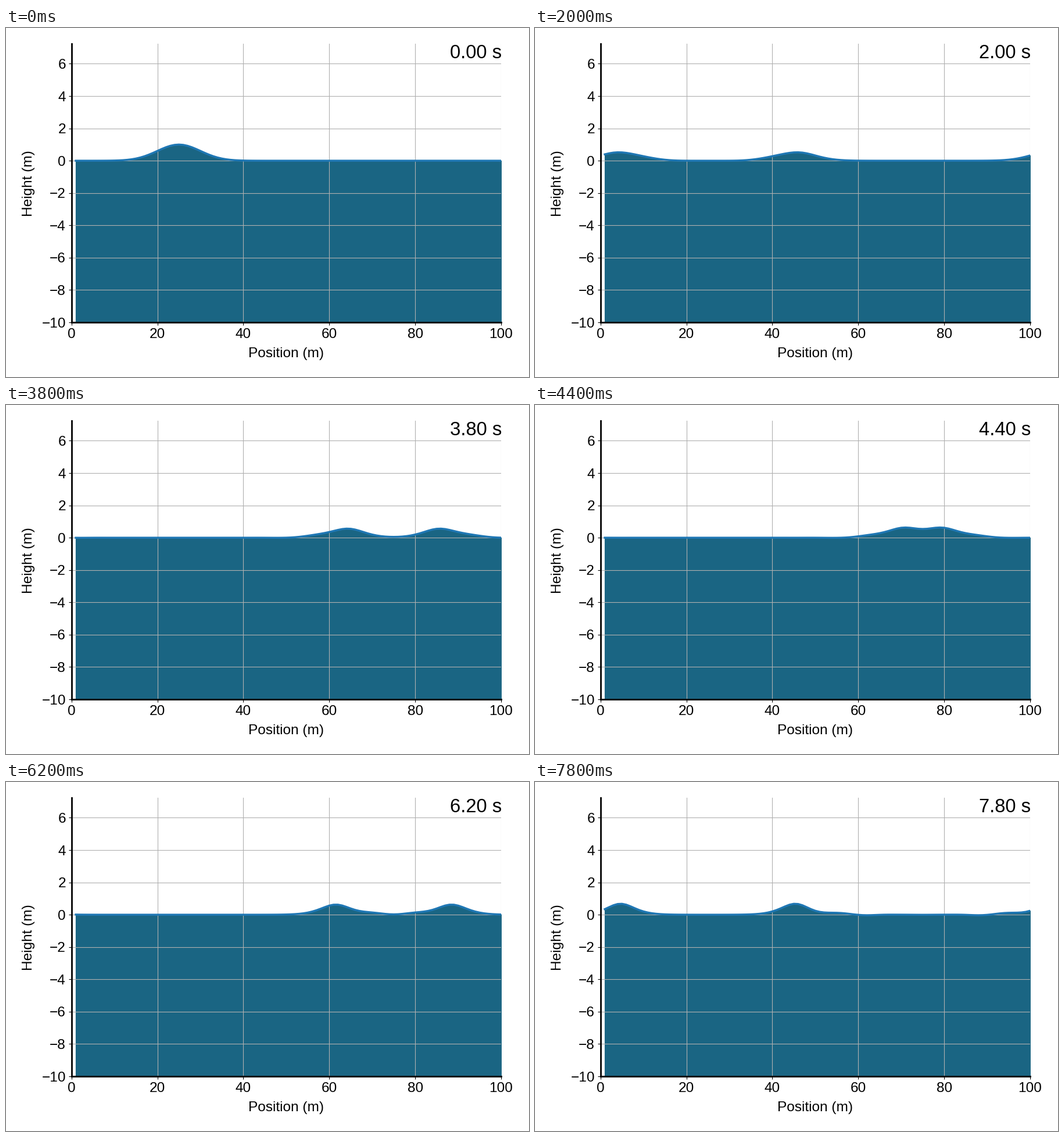
Animation, 900 px wide and 600 px high, one loop 8000 ms. Source, as a matplotlib script:

```python
import matplotlib.pyplot as plt
import numpy as np
from matplotlib.animation import FuncAnimation

W, H, DPI = 900, 600, 100
FRAMES, INTERVAL = 40, 200

# Shallow water on a periodic 100 m grid
GRAVITY, DEPTH = 9.81, 10.0
DT, STEPS = 0.01, 20
LEFT, RIGHT, TOP, BOTTOM = 112.7, 852, 26.7, 506.07
WATER = "#1a6583"


def slope(a):
    """Centred periodic difference for 1 m spacing."""
    return 0.5 * (np.roll(a, -1) - np.roll(a, 1))


def simulate(x):
    h = np.exp(-0.02 * (x - 25) ** 2)
    u = np.zeros_like(h)
    states = [h]
    for _ in range(FRAMES - 1):
        for _ in range(STEPS):
            du = u * slope(u) + GRAVITY * slope(h)
            dh = slope(u * (DEPTH + h))
            u, h = u - DT * du, h - DT * dh
        states.append(h)
    return states


plt.rcParams["font.family"] = "Liberation Sans"
plt.rcParams["font.size"] = 17.6

x = np.arange(1, 101, dtype=float)
heights = simulate(x)

fig = plt.figure(figsize=(W / DPI, H / DPI), dpi=DPI, facecolor="white")
ax = fig.add_axes([LEFT / W, 1 - BOTTOM / H, (RIGHT - LEFT) / W, (BOTTOM - TOP) / H])
ax.set_xlim(0, 100)
ax.set_ylim(-DEPTH, 7.25)
ax.set_xticks(range(0, 101, 20))
ax.set_yticks(range(-10, 7, 2))
ax.grid(color="#b0b0b0", linewidth=0.8)
for side in ("top", "right"):
    ax.spines[side].set_visible(False)
for side in ("left", "bottom"):
    ax.spines[side].set_linewidth(2)


def label(px, py, text, **style):
    return fig.text(px / W, 1 - py / H, text, **style)


label((LEFT + RIGHT) / 2, 566, "Position (m)", ha="center", va="baseline")
label(38.5, 267, "Height (m)", ha="center", va="center", rotation=90)
clock = label(RIGHT + 1, 52, "", ha="right", va="baseline", fontsize=23.6)

water = ax.fill_between(x, -DEPTH, heights[0], color=WATER)
surface, = ax.plot(x, heights[0], color="#1f77b4", linewidth=2.5)


def draw(i):
    h = heights[i]
    surface.set_ydata(h)
    outline = np.column_stack([
        np.concatenate([[x[0]], x, [x[-1]]]),
        np.concatenate([[-DEPTH], h, [-DEPTH]]),
    ])
    water.set_verts([outline])
    clock.set_text(f"{i * STEPS * DT:.2f} s")
    return water, surface, clock


anim = FuncAnimation(fig, draw, frames=FRAMES, interval=INTERVAL,
                     init_func=lambda: draw(0), repeat=True, repeat_delay=0)
plt.show()
```
